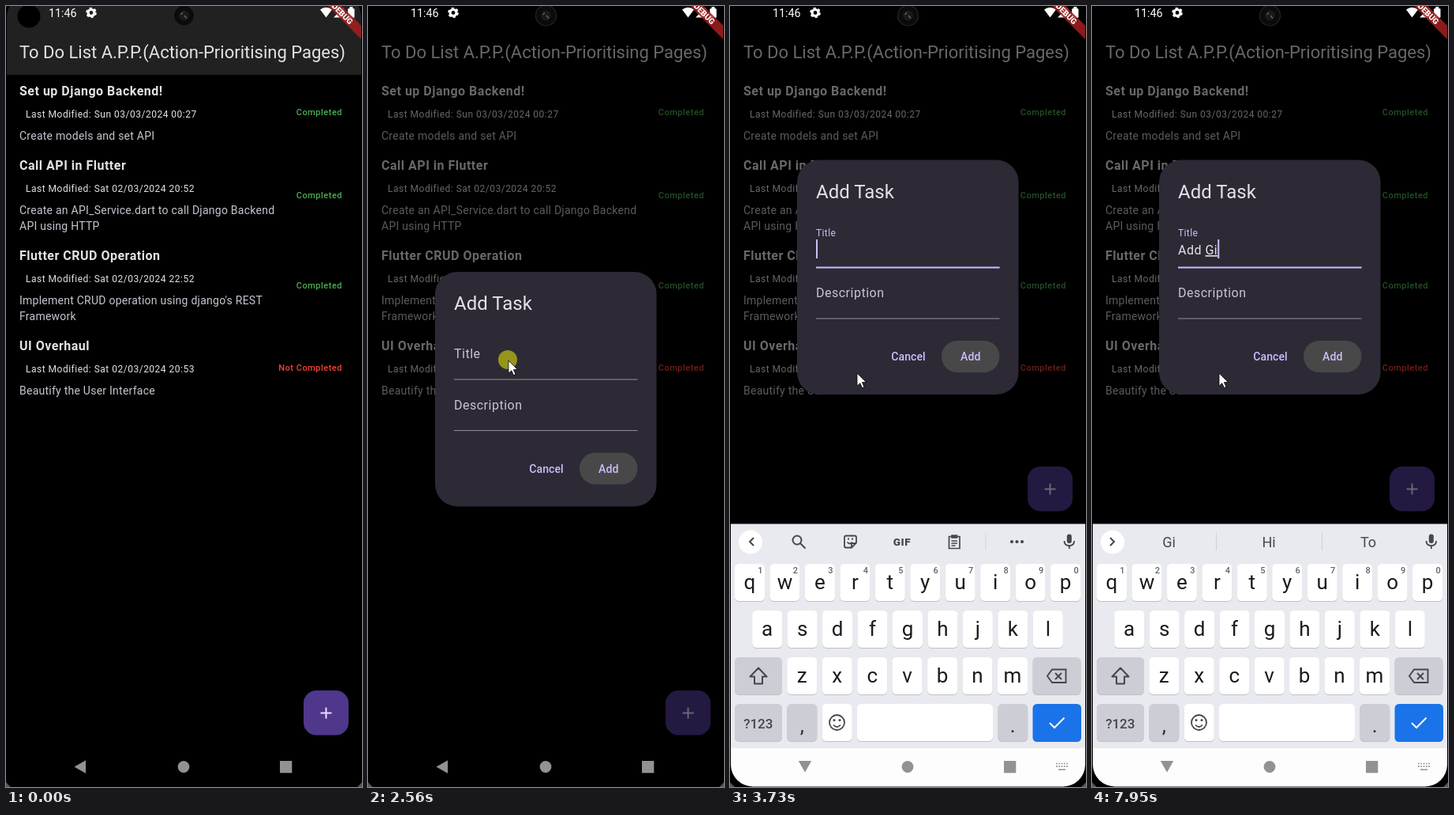
Write an HTML page that moves like this. It is 451 px wide and 987 px high and loops after 8000 ms.

```html
<!DOCTYPE html>
<html lang="en">
<head>
<meta charset="utf-8">
<title>To do list</title>
<style>
html, body { margin: 0; width: 100%; height: 100%; overflow: hidden; background: #000; }
svg { display: block; width: 100%; height: 100%; font-family: Roboto, sans-serif; }
text { white-space: pre; }
</style>
</head>
<body>
<svg id="stage" viewBox="0 0 451 987"></svg>
<script>
const LIGHT = '#e6e1e5', SOFT = '#cac4d0', LILAC = '#d0bcff', ICON = '#44474b';

const text = (x, y, size, fill, str, more = '') =>
  `<text x="${x}" y="${y}" font-size="${size}" fill="${fill}" ${more}>${str}</text>`;
const rect = (x, y, w, h, fill, r = 0, more = '') =>
  `<rect x="${x}" y="${y}" width="${w}" height="${h}" fill="${fill}" rx="${r}" ${more}/>`;
const disc = (x, y, r, fill, more = '') =>
  `<circle cx="${x}" cy="${y}" r="${r}" fill="${fill}" ${more}/>`;
const line = (d, color = ICON, w = 2, more = '') =>
  `<path d="${d}" fill="none" stroke="${color}" stroke-width="${w}" ${more}/>`;
const spaced = n => `letter-spacing="${n}"`;
const MID = 'text-anchor="middle"';

// Task list
const tasks = [
  [113, 'Set up Django Backend!', 'Sun 03/03/2024 00:27', ['Create models and set API'], 138],
  [207, 'Call API in Flutter', 'Sat 02/03/2024 20:52',
    ['Create an API_Service.dart to call Django Backend', 'API using HTTP'], 243],
  [321, 'Flutter CRUD Operation', 'Sat 02/03/2024 22:52',
    ["Implement CRUD operation using django's REST", 'Framework'], 357],
  [435, 'UI Overhaul', 'Sat 02/03/2024 20:53', ['Beautify the User Interface'], 461]
];
const task = ([y, title, date, lines, statusY], i) =>
  text(17, y, 16, LIGHT, title, 'font-weight="700" ' + spaced(.5)) +
  text(25, y + 28, 12, LIGHT, 'Last Modified: ' + date, spaced(.5)) +
  lines.map((s, n) => text(17, y + 56 + 20 * n, 14, SOFT, s, spaced(.25))).join('') +
  text(426, statusY, 11, i < 3 ? '#4caf50' : '#f44336', i < 3 ? 'Completed' : 'Not Completed',
    'text-anchor="end" font-weight="500" ' + spaced(.5));

const app =
  rect(0, 0, 451, 87, '#212121', 0, 'id="bar"') +
  text(17, 66, 22, LIGHT, 'To Do List A.P.P.(Action-Prioritising Pages)') +
  tasks.map(task).join('') +
  `<g id="fab">${rect(377, 865, 57, 56.5, '#4f378b', 16)}
    ${rect(377, 865, 57, 56.5, '#eaddff', 16, 'id="press"')}
    ${line('M398.5 893.5h14M405.5 886.5v14', '#eaddff')}</g>`;

// Dialog
const dialog =
  rect(85, 336, 280.5, 296.5, '#2d2a36', 28) +
  text(109, 384, 24, LIGHT, 'Add Task') +
  text(0, 0, 16, SOFT, 'Title', 'id="label" ' + spaced(.5)) +
  rect(109, 471.5, 232.5, 1, '#938f99') +
  rect(109, 471, 232.5, 2, LILAC, 0, 'id="focus"') +
  `<text x="109" y="455.5" font-size="16" fill="${LIGHT}" ${spaced(.5)} id="field"><tspan></tspan><tspan text-decoration="underline"></tspan></text>` +
  rect(109, 436.5, 2, 24, LILAC, 0, 'id="caret"') +
  text(109, 509.5, 16, SOFT, 'Description', spaced(.5)) +
  rect(109, 536, 232.5, 1, '#938f99') +
  rect(268, 564.5, 73.5, 40, '#484848', 20) +
  ['Cancel', 'Add'].map((s, i) =>
    text([226, 304.7][i], 589.6, 14, LILAC, s, MID + ' font-weight="500" ' + spaced(.1))).join('');

// Keyboard
const key = (x, y, w, fill) =>
  rect(x, y + 1, w, 47, '#bfc1c7', 5.5) + rect(x, y, w, 47, fill, 5.5);
const letters = (row, x0, y) => [...row].map((c, i) => {
  const x = x0 + 44.45 * i;
  return key(x - 19, y, 38, '#fff') +
    text(x, y + 32, 26, '#1b1b1f', c, MID + ' class="letter"') +
    (y < 710 ? text(x + 13.5, y + 11.7, 11, '#5f6368', (i + 1) % 10, MID + ' font-weight="500"') : '');
}).join('');
const GRAY = '#cdced5';

const tools =
  line('M30 672l-5 5l5 5') +
  `<circle cx="85" cy="675" r="5.5" fill="none" stroke="${ICON}" stroke-width="2"/>` +
  line('M89 679l6.5 6.5') +
  line('M147 669.5h11q2 0 2 2v7l-6 6h-7q-2 0-2-2v-11q0-2 2-2M154 684v-5h6M148.5 677.5q3.5 4 6 0M149 673.5h2M154 673.5h2', ICON, 1.8) +
  text(218, 682, 13.5, ICON, 'GIF', MID + ' font-weight="900" ' + spaced(.6)) +
  line('M277.5 670.5h13.5v15h-13.5zM281 669h6.5v3h-6.5zM280.5 676h7.5M280.5 679h7.5M280.5 682h5', ICON, 1.7) +
  line('M324 666v22', '#d2d4d9', 1) +
  [357, 363.5, 370].map(x => disc(x, 677, 2.1, ICON)).join('');
const hints =
  line('M23 672l5 5l-5 5') + line('M157.5 666v22M291.5 666v22', '#cfd1d6', 1) +
  [97.5, 224, 350].map(x => text(x, 683.5, 18, ICON, '', MID + ' class="hint"')).join('');

const keyboard =
  rect(0, 654.5, 451, 284, '#e9eaef') + rect(0, 938, 451, 120, '#fdfdfd') +
  disc(26, 677.5, 15, '#fff') +
  `<g id="tools">${tools}</g><g id="hints">${hints}</g>` +
  rect(426.8, 667.5, 6, 11.5, ICON, 3) + line('M423.5 676q0 6 6.3 6t6.3-6M429.8 682v4', ICON, 1.8) +
  letters('qwertyuiop', 25, 705) + letters('asdfghjkl', 47.2, 764) + letters('zxcvbnm', 91.3, 823) +
  key(6, 823, 60, GRAY) + line('M36 836.5l10.5 11h-5.5v9h-10v-9h-5.5z', ICON, 2, 'id="shift" stroke-linejoin="round"') +
  key(383.5, 823, 61, GRAY) +
  line('M408 838.5h17.5v16.5h-17.5l-6-8.2zM412 843l8 8M420 843l-8 8', ICON, 1.9) +
  key(6, 882, 60, GRAY) + text(35.8, 912.5, 17, ICON, '?123', MID + ' font-weight="500"') +
  key(72.3, 882, 38, GRAY) + text(91.3, 918, 26, '#2b2c30', ',', MID) +
  key(116.7, 882, 38, '#fff') +
  line('M126 905.5a9.5 9.5 0 1 0 19 0a9.5 9.5 0 1 0-19 0M131 908.5q4.5 5 9 0', ICON, 1.8) +
  disc(132, 902.5, 1.5, ICON) + disc(139, 902.5, 1.5, ICON) +
  key(161, 882, 172, '#fff') +
  key(339.3, 882, 38, GRAY) + text(358.3, 918, 26, '#2b2c30', '.', MID) +
  rect(383.5, 882, 61.5, 48, '#1a73e8', 5.5) + line('M405 906l6 6l12.5-12.5', '#fff');

// System bars
const gear = disc(108, 8.5, 4, 'none', 'stroke="#fff" stroke-width="3.2"') +
  disc(108, 8.5, 5.9, 'none', 'stroke="#fff" stroke-width="1.9" stroke-dasharray="3.1 3.08"');
const system =
  disc(29, 13, 14.5, '#000') +
  disc(225.5, 12, 13, '#0b0b0b', 'stroke="#242424" stroke-width="1.2"') +
  disc(225.5, 12, 6.5, '#1a1a1a') + line('M221.5 11l2.5-2.5M226 12l3 3.5', '#666', 1.3) +
  text(54, 14, 14.3, '#fff', '11:46') + gear +
  '<path d="M405.5 14.5L398 4.5q7.5-5.5 15 0zM415 14.5L427.5 2v12.5z" fill="#fff"/>' +
  rect(433, 3, 8.5, 12, '#fff', 1.5) + rect(435.3, 1, 4, 3, '#fff') +
  `<path d="M408 0L450 42V24.7L425.3 0z" fill="#a51f1f" fill-opacity=".86"/>` +
  text(0, 3.7, 10.2, '#fff', 'DEBUG', MID + ' font-weight="900" transform="translate(426.2 9.7) rotate(45)"') +
  '<g fill="#929292"><path id="back" d="M86.5 961.5L101 953.3v16.4z"/>' +
  '<circle cx="225" cy="961.5" r="7.4"/><path d="M347 954h15.3v15.3H347z"/></g>' +
  `<g id="ime">${line('M413 957.5h15M413 960.8h15', '#929292', 1.7, 'stroke-dasharray="1.8 1.5"')}
    ${line('M416 965h9', '#929292', 1.7)}</g>`;

document.getElementById('stage').innerHTML =
  `<clipPath id="screen">${rect(1, -14, 449, 1000.5, '#000', 28)}</clipPath>
  <path d="M0 981v6h6zM451 981v6h-6z" fill="#555"/>
  <g clip-path="url(#screen)">${app}
    <g id="modal">${rect(0, 0, 451, 987, '#000', 0, 'opacity=".54"')}<g id="dialog">${dialog}</g></g>
    <g id="keyboard">${keyboard}</g>${system}</g>
  ${disc(-1, -1, 12, '#ff0', 'id="click" opacity=".5"')}
  <path id="mouse" d="M0 0V16.2L3.8 12.7L6.4 18.6L9 17.4L6.4 11.6H11.5Z" fill="#fff" stroke="#000" stroke-width=".8"/>`;

const $ = id => document.getElementById(id);
const letterKeys = [...document.querySelectorAll('.letter')];
const hintWords = [...document.querySelectorAll('.hint')];
const [typed, composing] = $('field').children;

const set = (id, name, value) => $(id).setAttribute(name, value);
const move = (id, x, y) => set(id, 'transform', `translate(${x} ${y})`);
const show = (id, on) => set(id, 'visibility', on ? 'inherit' : 'hidden');
const latest = (steps, t) => steps.filter(s => s[0] <= t).pop();

const mousePath = [[180, 345, 985], [250, 332, 936], [480, 247, 703], [870, 411, 875],
  [1600, 411, 875], [2450, 178, 448], [2720, 178, 448], [2980, 161, 464]];
const typing = [[0, '', ''], [5460, '', 'A'], [5590, '', 'Ad'], [5720, '', 'Add'], [5860, 'Add ', ''],
  [6330, 'Add G', ''], [6530, 'Add ', 'G'], [6800, 'Add ', 'Gi'], [7070, 'Add ', 'Git'], [7670, 'Add ', 'Gi']];
const suggestions = [[0, '', '', ''], [5790, 'a', 'the', 'to'], [6530, 'G', 'Get', 'Going'],
  [6870, 'Gi', 'Hi', 'To'], [7200, 'Gut', 'Git', 'Got'], [7740, 'Gi', 'Hi', 'To']];

function mouseAt(t) {
  const i = mousePath.findIndex(p => p[0] > t);
  if (i < 1) return mousePath.at(i).slice(1);
  const [a, b] = [mousePath[i - 1], mousePath[i]];
  const u = (t - a[0]) / (b[0] - a[0]), e = u * u * (3 - 2 * u);
  return [1, 2].map(n => a[n] + (b[n] - a[n]) * e);
}

function draw(t) {
  const span = (a, b) => Math.min(1, Math.max(0, (t - a) / (b - a)));
  const easeOut = (a, b, power) => 1 - (1 - span(a, b)) ** power;
  const open = t >= 1460;

  show('modal', open);
  set('bar', 'opacity', open ? 0 : 1);
  set('press', 'opacity', open ? .12 * (1 - span(1460, 2200)) : 0);
  move('fab', 0, -283 * easeOut(3150, 3500, 3));
  move('dialog', 0, -141.5 * easeOut(3475, 3585, 2));

  const focus = easeOut(2850, 3020, 2);
  set('label', 'transform', `translate(109 ${445.3 - 12.8 * focus}) scale(${1 - focus / 4})`);
  set('label', 'fill', focus > .5 ? LILAC : SOFT);
  set('focus', 'opacity', focus);

  const [, done, draft] = latest(typing, t);
  typed.textContent = done;
  composing.textContent = draft;
  const width = done || draft ? $('field').getComputedTextLength() : 0;
  set('caret', 'x', 109 + width);
  show('caret', t >= 2960 && t < 3200 || t >= 3730 && t < 4260 || t >= 4720 && t < 5260 || t >= 5460);

  show('keyboard', t >= 3090);
  move('keyboard', 0, 332 * (1 - easeOut(3090, 3465, 3)));
  const upper = t >= 5260 && t < 5530;
  for (const k of letterKeys)
    k.textContent = upper ? k.textContent.toUpperCase() : k.textContent.toLowerCase();
  set('shift', 'fill', upper ? ICON : 'none');
  const words = latest(suggestions, t).slice(1);
  show('tools', !words[0]);
  show('hints', words[0]);
  hintWords.forEach((w, i) => w.textContent = words[i]);

  show('ime', t >= 3040);
  const turn = span(3180, 3480);
  set('back', 'transform', `translate(0 ${-1.5 * turn}) rotate(${-90 * turn} 95 961.5)`);

  const [x, y] = mouseAt(t);
  show('mouse', t >= 180);
  move('mouse', x, y);
  show('click', t >= 1000 && t < 1460 || t >= 2520 && t < 2720);
  move('click', x, y);
}

function frame() {
  draw(performance.now() % 8000);
  requestAnimationFrame(frame);
}
frame();
</script>
</body>
</html>
```
